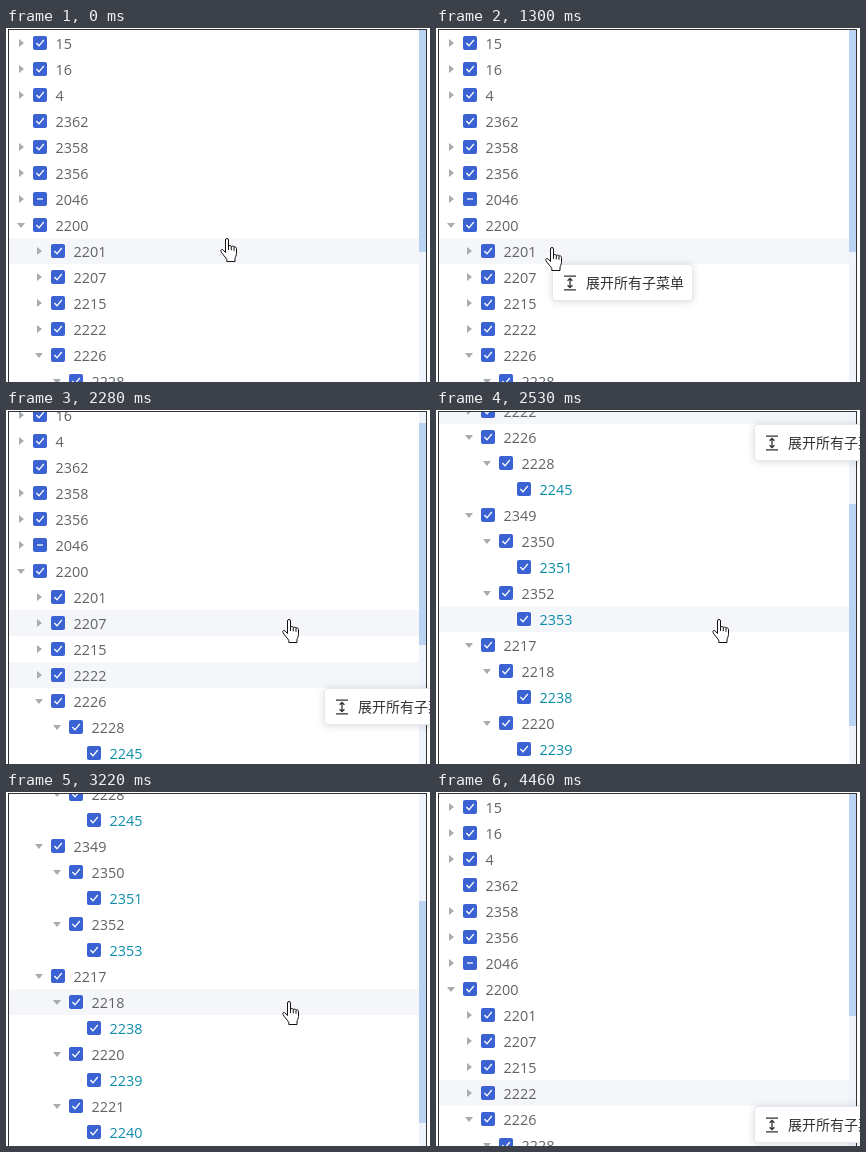
An HTML page that plays this animation: 424x354 px, repeating every 5010 ms.

```html
<!DOCTYPE html>
<html lang="zh">
<head>
<meta charset="utf-8">
<title>Tree menu</title>
<style>
  html, body { margin: 0; width: 100%; height: 100%; overflow: hidden; background: #fff; }
  #stage { position: relative; width: 424px; height: 354px; overflow: hidden; }
  #stage > * { position: absolute; }
  #panel { left: 2px; top: 1px; width: 417px; height: 360px; border: 1px solid #333; overflow: hidden; }
  #tree { position: absolute; left: 0; top: 0; width: 410px; }
  .row { position: relative; height: 26px; font: 14.4px/26px "Open Sans", "Noto Sans", sans-serif; color: #606266; }
  .row.lit { background: #f5f6fa; }
  .row svg { position: absolute; top: 0; width: 36px; height: 26px; }
  .row span { position: absolute; top: 1px; }
  .link { color: #0b8daa; }
  #track { position: absolute; right: 0; top: 0; width: 7px; height: 100%; background: #eff4fc; }
  #thumb { width: 7px; height: 222px; background: #bcd4f3; }
  #menu { left: 0; top: 0; width: 139px; height: 35px; border: 1px solid #e4e7ed; border-radius: 4px;
    background: #fff; box-shadow: 0 1px 8px rgba(0, 0, 0, .14); color: #333; white-space: nowrap;
    font: 14px/35px "Noto Sans CJK SC", "Noto Sans CJK", "Noto Sans CJK JP", sans-serif; }
  #menu svg { position: absolute; left: 10px; top: 10px; }
  #menu span { position: absolute; left: 33px; top: 0; }
  #hand { left: 0; top: 0; }
</style>
</head>
<body>
<div id="stage">
  <div id="panel">
    <div id="tree"></div>
    <div id="track"><div id="thumb"></div></div>
  </div>
  <div id="menu">
    <svg width="14" height="16" viewBox="0 0 14 16" fill="none" stroke="#333" stroke-width="1.3">
      <path d="M1 1.2H13M1 14.8H13M7 3.5V12.5M4.6 5.8L7 3.4L9.4 5.8M4.6 10.2L7 12.6L9.4 10.2"/>
    </svg>
    <span>展开所有子菜单</span>
  </div>
  <svg id="hand" width="18" height="25" viewBox="0 0 18 25" fill="#fff" stroke="#111" stroke-linejoin="round">
    <path d="M5.5 14.5V2a1.5 1.5 0 0 1 3 0V8.2c.5-1 2.5-.9 2.8.3.6-.8 2.4-.6 2.7.6.8-.6 2.5-.2 2.5 1.4V15.5c0 2-1.5 3.5-1.5 5.5V23.5H6.8V21.5C6 19.5 2.5 16.5 1 13.5.2 11.8 2 10.8 3.2 12Z"/>
    <path fill="none" d="M8.5 8V12M11.3 8.5V12.3M14 9.1V12.8"/>
  </svg>
</div>
<script>
const LOOP = 5010, BEAT = 134, ROW = 26, TOP = 2, HOT = 7, MENU_HEIGHT = 37;

// level, state (> closed, v open, . leaf, - partly checked), label
const items = `0>15 0>16 0>4 0.2362 0>2358 0>2356 0-2046 0v2200 1>2201 1>2207 1>2215 1>2222
  1v2226 2v2228 3.2245 1v2349 2v2350 3.2351 2v2352 3.2353 1v2217 2v2218 3.2238 2v2220 3.2239
  2v2221 3.2240 2v2402 3.2241`.split(/\s+/);

// Each move: first beat, last beat, place reached
const handStart = [214, 210];
const handMoves = [
  [0, 3, 45, 127], [4, 5, 184, 147], [5, 7, 58, 150], [7, 9, 109, 219],
  [10, 13, 358, 291], [13, 14, 311, 291], [15, 16, 276, 209], [30, 32, 355, 322]
];
const wheelMoves = [[16, 17, 36], [17, 19, 300], [20, 21, 382], [21, 22, 400], [22, 24, 351], [24, 26, 0]];
const clicks = [10, 15], handLeaves = 33;

const $ = id => document.getElementById(id);
const place = (el, x, y) => { el.style.transform = `translate(${x}px, ${y}px)`; };

function ease(p) {
  const k = Math.min(1, Math.max(0, p));
  return k * k * (3 - 2 * k);
}

function glide(start, moves, beat) {
  return moves.reduce((pos, [from, to, ...goal]) => {
    const k = ease((beat - from) / (to - from));
    return pos.map((v, i) => Math.round(v + (goal[i] - v) * k));
  }, start);
}

function pointer(beat) {
  const [x, y] = glide(handStart, handMoves, beat);
  const [offset] = glide([0], wheelMoves, beat);
  return { x, y, offset, row: Math.floor((y - TOP + offset) / ROW) };
}

function rowHtml(item) {
  const level = +item[0], state = item[1], indent = level * 18;
  const caret = state === '.' ? '' : state === 'v' ? 'M4 11H12L8 16Z' : 'M6 9L11 13L6 17Z';
  const mark = state === '-' ? 'M24 13H30' : 'M23.4 13L26 15.8L30.8 10';
  return `<div class="row"><svg style="left:${4 + indent}px">
    <path d="${caret}" fill="#a8abb0"/>
    <rect x="20" y="6" width="14" height="14" rx="2" fill="#3a62d3"/>
    <path d="${mark}" fill="none" stroke="#fff" stroke-width="1.3"/></svg>
    <span class="${level === 3 ? 'link' : ''}" style="left:${46.5 + indent}px">${item.slice(2)}</span></div>`;
}

$('tree').innerHTML = items.map(rowHtml).join('');
const rows = [...$('tree').children];

// Opens under the clicked row, scrolls with it, fades just before the next click
function drawMenu(beat, offset) {
  const click = clicks.findLast(b => b <= beat);
  const spot = click ? pointer(click) : { x: 0, row: -1 };
  const x = spot.x + HOT, y = TOP + (spot.row + 1) * ROW - offset;
  const visible = click && y > -MENU_HEIGHT;
  place($('menu'), x, y);
  $('menu').style.opacity = visible ? (clicks.includes(beat + 1) ? .5 : 1) : 0;
  return { x, y, row: spot.row, visible };
}

function draw(now) {
  const beat = Math.floor(now % LOOP / BEAT + .35);
  const { x, y, offset, row } = pointer(beat);
  const menu = drawMenu(beat, offset);
  const onMenu = menu.visible && x + HOT > menu.x && y >= menu.y && y < menu.y + MENU_HEIGHT;
  const away = beat >= handLeaves;

  place($('hand'), x, y);
  $('hand').style.opacity = away ? 0 : 1;
  place($('tree'), 0, -offset);
  place($('thumb'), 0, Math.round(offset * .306));
  rows.forEach((el, i) => el.classList.toggle('lit', i === menu.row || i === row && !away && !onMenu));
}

let start;
function tick(now) {
  start ??= now;
  draw(now - start);
  requestAnimationFrame(tick);
}
draw(0);
requestAnimationFrame(tick);
</script>
</body>
</html>
```
